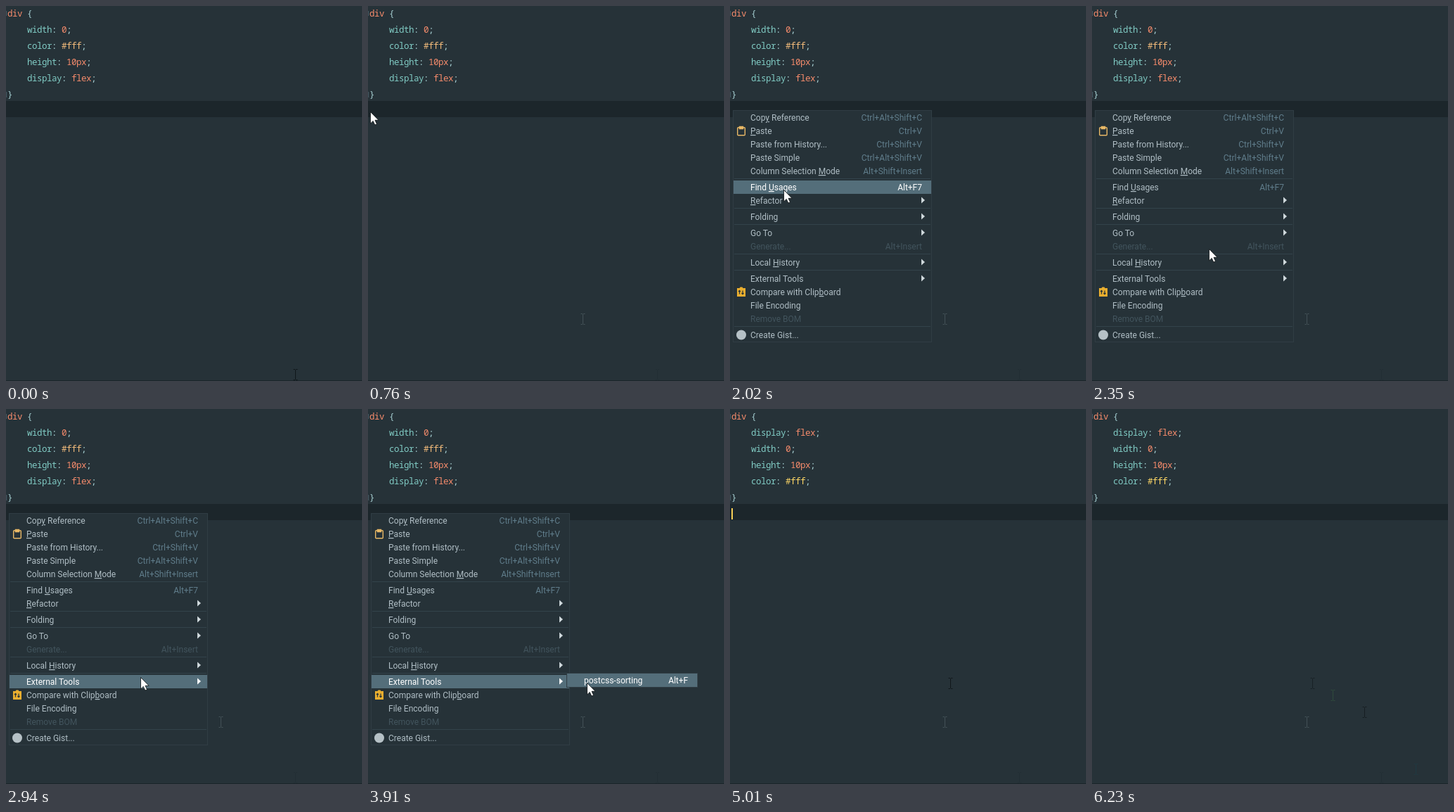
Write an HTML page that moves like this. It is 506 by 533 pixels and loops after 6.77 s.

```html
<!DOCTYPE html>
<html lang="en">
<head>
<meta charset="utf-8">
<title>Sorting CSS properties from the editor menu</title>
<style>
  html, body { margin: 0; width: 100%; height: 100%; overflow: hidden; background: #263238; }
  svg { display: block; }
  text { white-space: pre; }
  .code { font: 12.5px "Noto Sans Mono", "DejaVu Sans Mono", monospace; letter-spacing: -.5px; fill: #a9d3d6; }
  .sel, .val { fill: #f78c6c; }
  .prop { fill: #80cbc4; }
  .punct { fill: #a9d3d6; }
  .hex { fill: #f5bd7c; font-weight: 500; }
  .sorted .hex { fill: #ffd866; }
  .menu { font: 12px Roboto, "Noto Sans", sans-serif; fill: #b0bec5; }
  .menu .panel { fill: #263238; stroke: #303d44; }
  .menu .bar { fill: none; }
  .menu .keys { fill: #607d8b; text-anchor: end; }
  .menu .off, .menu .off .keys { fill: #42545d; }
  .menu .on, .menu .on .keys { fill: #fff; }
  .menu .on .bar { fill: #546e7a; }
  .menu .sep { stroke: #33434b; }
  .menu .more { fill: #cfd8dc; }
  .menu .on .more { fill: #fff; }
  .menu .mnemonic { text-decoration: underline; }
  .beam { fill: none; stroke: #10171a; }
</style>
</head>
<body>
<svg id="stage" width="506" height="533" xmlns="http://www.w3.org/2000/svg">
  <defs>
    <path id="beam" d="M-3 -7.5H-.5M.5 -7.5H3M0 -7V7M-3 7.5H-.5M.5 7.5H3"/>
  </defs>
  <rect width="506" height="533" fill="#263238"/>
  <rect y="135" width="506" height="23" fill="#1c262b"/>
  <rect y="532" width="506" height="1" fill="#1b252a"/>
  <path d="M.5 7V14M.5 122V130" stroke="#465a64"/>
  <g id="before" class="code"></g>
  <g id="after" class="code sorted"></g>
  <rect id="caret" x="2" y="141" width="2" height="16" fill="#f7cf56"/>
  <g id="ghosts" class="beam"></g>
  <g id="mainMenu" class="menu"></g>
  <g id="historyMenu" class="menu"></g>
  <g id="toolsMenu" class="menu"></g>
  <use id="textCursor" href="#beam" class="beam"/>
  <path id="arrow" d="M.5 .5V17L4.2 13.4L6.8 19L9.5 17.8L7 12.3H12Z"
        fill="#fff" stroke="#0c1114" stroke-width=".8"/>
</svg>
<script>
const LOOP = 6770;
const $ = id => document.getElementById(id);
const show = (el, visible) => el.setAttribute('visibility', visible ? 'visible' : 'hidden');
const place = (el, [x, y]) => el.setAttribute('transform', `translate(${x} ${y})`);
const span = (cls, text) => `<tspan class="${cls}">${text}</tspan>`;

// Code listing
const rules = { width: '0', color: '#fff', height: '10px', display: 'flex' };

function listing(order) {
  const line = (x, row, body) => `<text x="${x}" y="${15 + row * 23}">${body}</text>`;
  const rows = order.map((name, i) => line(30, i + 1,
    span('prop', name) + span('punct', ': ') +
    span(name === 'color' ? 'hex' : 'val', rules[name]) + span('punct', ';')));
  return line(2, 0, span('sel', 'div') + ' {') + rows.join('') + line(2, 5, '}');
}
$('before').innerHTML = listing(['width', 'color', 'height', 'display']);
$('after').innerHTML = listing(['display', 'width', 'height', 'color']);

// Menus: "_" precedes a mnemonic, ">" marks a submenu, a leading "-" a disabled item
const ROW = 19, GAP = 4;
const mainItems = [
  ['Cop_y Reference', 'Ctrl+Alt+Shift+C'], ['_Paste', 'Ctrl+V'],
  ['Paste from History...', 'Ctrl+Shift+V'], ['Paste Simple', 'Ctrl+Alt+Shift+V'],
  ['Column Selection _Mode', 'Alt+Shift+Insert'], null,
  ['Find _Usages', 'Alt+F7'], ['_Refactor', '>'], null,
  ['Folding', '>'], null,
  ['Go To', '>'], ['-Generate...', 'Alt+Insert'], null,
  ['Local _History', '>'], null,
  ['External Tools', '>'], ['Compare with Clip_board'], ['File Encoding'], ['-Remove BOM'], null,
  ['Create Gist...']
];

function buildMenu(id, x, top, width, items, keysX) {
  let y = top, body = '';
  const spots = [];
  for (const item of items) {
    if (!item) {
      body += `<path class="sep" d="M${x + 1} ${y + 1.5}h${width - 2}"/>`;
      y += GAP;
      continue;
    }
    const [label, extra = ''] = item;
    const off = label.startsWith('-');
    const text = label.replace(/^-/, '').replace(/_(.)/, span('mnemonic', '$1'));
    const side = extra === '>'
      ? `<path class="more" d="M${x + 267} ${y + 4.5}v9l5 -4.5z"/>`
      : `<text class="keys" x="${keysX}" y="${y + 14}">${extra}</text>`;
    body += `<g class="row${off ? ' off' : ''}">
      <rect class="bar" x="${x}" y="${y}" width="${width}" height="${ROW}"/>
      <text x="${x + 24}" y="${y + 14}">${text}</text>${side}</g>`;
    spots.push({ top: y, off });
    y += ROW;
  }
  const menu = $(id);
  menu.innerHTML = `<rect class="panel" x="${x - .5}" y="${top - .5}"
    width="${width + 1}" height="${y - top + 1}"/>` + body;
  const rows = menu.querySelectorAll('.row');
  return spots.map((spot, i) => ({ ...spot, el: rows[i] }));
}

const mainRows = buildMenu('mainMenu', 5, 149, 281, mainItems, 273);
buildMenu('historyMenu', 283, 353, 178,
  [['Show History'], ['-Show History for Selection'], ['Put Label...']], 450);
const [toolRow] = buildMenu('toolsMenu', 283, 376, 185, [['postcss-sorting', 'Alt+F']], 455);

// Item icons
$('mainMenu').insertAdjacentHTML('beforeend', `
  <g fill="none" stroke="#e8b866" stroke-width="1.4">
    <rect x="10.7" y="172.7" width="10.6" height="11" rx="1"/>
    <path d="M13.5 171.5h5v3h-5z" fill="#e8b866"/>
  </g>
  <path d="M10 401h3.5l1 -1.5h3l1 1.5h3.5v12h-12z" fill="#e9ae2f"/>
  <path d="M13.5 409.5v-5m-1.5 1.5l1.5 -1.7l1.5 1.7M18 404.5v5m-1.5 -1.5l1.5 1.7l1.5 -1.7"
    fill="none" stroke="#263238" stroke-width="1.2"/>
  <circle cx="16" cy="467.5" r="7" fill="#b6c1c6"/>`);

// Faint text cursors that stay behind: [from, x, y, colour]
const ghosts = [
  [40, 411, 524, '#222e34'], [40, 305, 445, '#435156'], [5390, 313, 390, '#182125'],
  [5430, 342, 407, '#2f4a3c'], [5480, 387, 431, '#161e22'], [5810, 460, 512, '#203841']
].map(([from, x, y, colour]) => {
  $('ghosts').insertAdjacentHTML('beforeend',
    `<use href="#beam" x="${x + .5}" y="${y}" stroke="${colour}"/>`);
  return { from, el: $('ghosts').lastElementChild };
});

// Pointer tracks: [time, x, y, steps towards the next key]; a bare time hides the pointer
const arrowTrack = [
  [0], [590, -7, 150], [650, -3, 150], [700, 1, 150], [760, 3, 150], [940, 3, 147],
  [990, 4, 143], [1690, 6, 151], [1920, 22, 178], [1965, 48, 218], [2010, 76, 261, 4],
  [2190, 133, 320, 3], [2330, 166, 345, 5], [2560, 190, 373], [2890, 191, 379],
  [2940, 191, 381], [2990, 194, 383], [3400, 206, 386, 6], [3680, 270, 391, 5],
  [3910, 311, 389], [4190]
];
const beamTrack = [
  [0, 411, 524], [40, 305, 445], [90, 66, 293], [140], [4230, 313, 390],
  [5390, 342, 407], [5430, 387, 431], [5480, 415, 455, 3], [5620, 440, 485, 3],
  [5760, 460, 512], [5810, 470, 521], [5850, 478, 531], [5900]
];

function follow(track, t) {
  const i = track.findLastIndex(key => key[0] <= t);
  const [start, x, y, steps] = track[i];
  if (x === undefined) return null;
  if (!steps) return [x, y];
  const [end, x2, y2] = track[i + 1];
  const u = Math.floor((t - start) / (end - start) * steps) / steps;
  return [x + (x2 - x) * u, y + (y2 - y) * u];
}

function movePointer(el, point, nudge = 0) {
  show(el, point);
  if (point) place(el, [point[0] + nudge, point[1]]);
}

const within = (t, from, to) => t >= from && t < to;

function render(t) {
  const arrow = follow(arrowTrack, t);
  movePointer($('arrow'), arrow);
  movePointer($('textCursor'), follow(beamTrack, t), .5);

  show($('before'), t < 5010);
  show($('after'), t >= 5010);
  show($('caret'), within(t, 1180, 1690) || within(t, 4270, 4750) || within(t, 5010, 6230));
  show($('mainMenu'), within(t, 1740, 4190));
  show($('historyMenu'), within(t, 2610, 2890));
  show($('toolsMenu'), within(t, 3170, 4190));

  const active = t >= 1920 && arrow;
  for (const { el, top, off } of mainRows)
    el.classList.toggle('on', !!active && !off && within(arrow[1], top, top + ROW));
  toolRow.el.classList.toggle('on', !!arrow && arrow[0] >= 284);
  for (const { el, from } of ghosts) show(el, t >= from);
}

const began = performance.now();
function tick() {
  render((performance.now() - began) % LOOP);
  requestAnimationFrame(tick);
}
tick();
</script>
</body>
</html>
```
